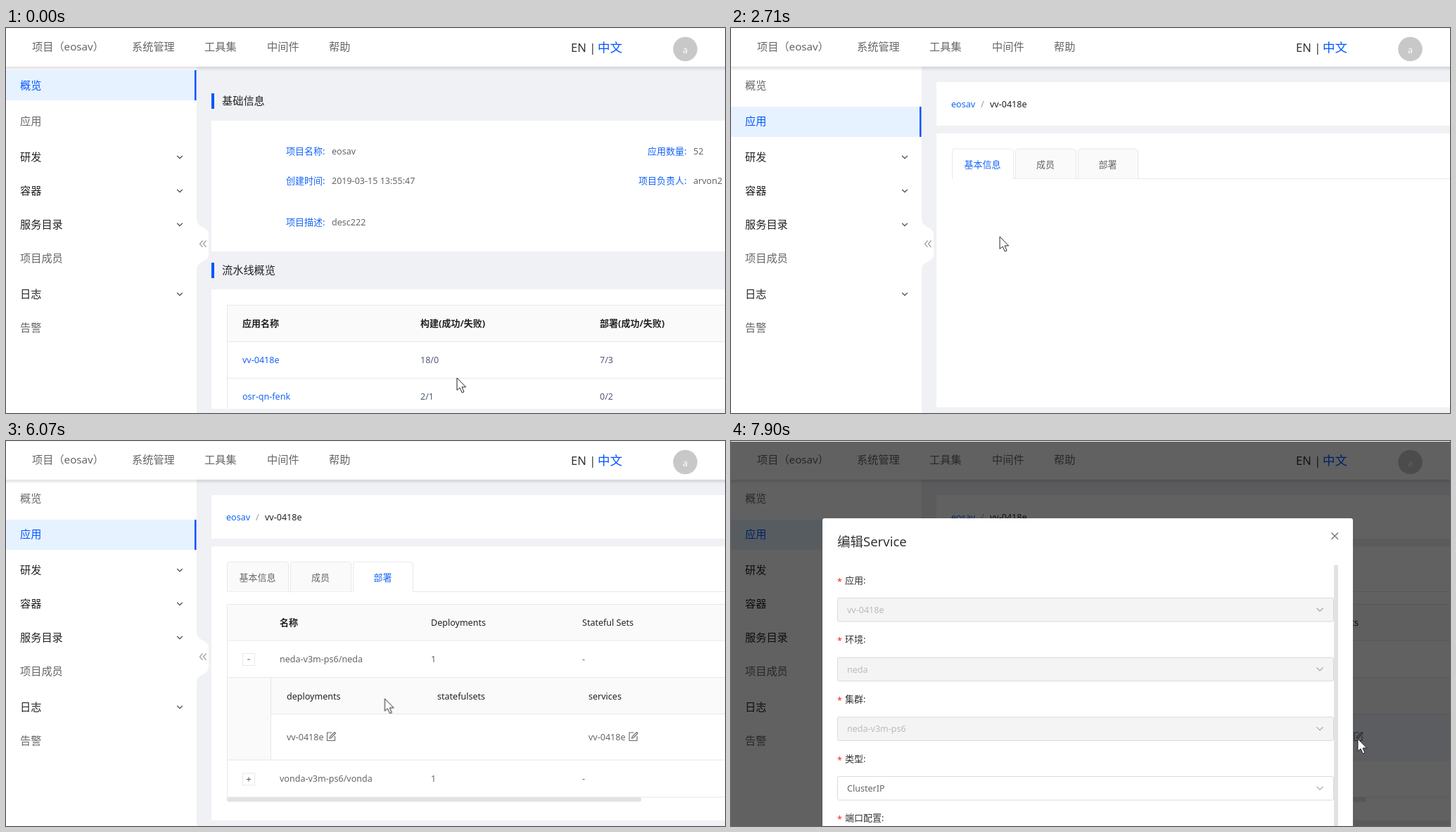
Recreate the animation shown at these times as an HTML page. Size 1022x548 px, loop 8000 ms.

```html
<!DOCTYPE html>
<html lang="zh-CN">
<head>
<meta charset="utf-8">
<style>
html, body { margin: 0; width: 100%; height: 100%; overflow: hidden; background: #f0f1f5; }
svg { display: block; width: 100%; height: 100%; }
text { font-family: "Noto Sans", "Noto Sans CJK SC", "Noto Sans CJK", sans-serif; white-space: pre; }
#modal { transform-origin: 510px 447px; }
</style>
</head>
<body>
<svg id="stage" viewBox="0 0 1022 548"></svg>
<script>
const LOOP = 8000;
const BLUE = '#0055ff', LINK = '#1464f6', GRAY = '#666', DARK = '#222', LINE = '#e8e8e8', BG = '#f0f1f5', HOVER = '#f5f8ff';
const PROJECT = 'eosav', USER = 'arvon2', APP = 'vv-0418e';
const ENV = 'neda', CLUSTER = 'neda-v3m-ps6', OTHER = 'vonda-v3m-ps6/vonda';

// ---------- drawing helpers ----------
const rect = (x, y, w, h, fill, extra = '') => `<rect x="${x}" y="${y}" width="${w}" height="${h}" fill="${fill}" ${extra}/>`;
const path = (d, stroke, extra = '') => `<path d="${d}" fill="none" stroke="${stroke}" ${extra}/>`;
const hline = (x, y, w) => rect(x, y, w, 1, LINE);
const group = (id, ...parts) => `<g id="${id}">${parts.flat().join('')}</g>`;

// Latin-only strings run slightly smaller and lighter to sit well beside the Chinese text.
const isLatin = str => /^[\x00-\x7f]+$/.test(str);
function text(x, cy, str, fill = GRAY, { size = 13, weight = 400, anchor = 'start', id = '' } = {}) {
  const px = isLatin(str) ? size * 0.965 : size;
  return `<text ${id && `id="${id}"`} x="${x}" y="${cy + size * 0.36}" font-size="${px}" font-weight="${weight}" text-anchor="${anchor}" fill="${fill}">${str}</text>`;
}
const bold = (x, cy, str) => text(x, cy, str, DARK, { weight: isLatin(str) ? 500 : 600 });
const menuText = (x, cy, str, fill, id) => text(x, cy, str, fill, { size: 15.2, id });
const chevron = (x, y, s, color) => path(`M${x - s} ${y - s / 2}l${s} ${s}l${s} ${-s}`, color, 'stroke-width="1.3"');
const panel = (y, h) => rect(292, y, 730, h, '#fff');
const scrollbar = (y, w) => rect(314, y, w, 6.5, '#e2e2e2', 'rx="3"');

const spinner = (id, x, y) => `<g transform="translate(${x} ${y})"><g id="${id}">` +
  [0.5, 0.32, 0.32, 0.32].map((o, i) =>
    `<circle cx="8.8" r="3.9" fill="${BLUE}" opacity="${o}" transform="rotate(${i * 90})"/>`).join('') + '</g></g>';

const editIcon = (x, y) => path(
  `M${x + 7} ${y + 1}H${x + 0.5}V${y + 12.5}H${x + 11.5}V${y + 6}M${x + 4} ${y + 9.2}L${x + 4.6} ${y + 6.8}L${x + 11} ${y + 0.5}L${x + 12.6} ${y + 2}L${x + 6.3} ${y + 8.5}Z`,
  'currentColor', 'stroke-width="1.1"');

const expander = (y, sign) => rect(336.5, y - 8.5, 17, 17, '#fff', `stroke="${LINE}"`) +
  path(sign === '+' ? `M342 ${y}h6M345 ${y - 3}v6` : `M343.3 ${y}h3.6`, '#555');

const selected = (y, cy, label) => rect(0, y, 271, 43, '#e6f2ff') + rect(268, y, 2.5, 43, BLUE) + menuText(20, cy, label, BLUE);

// ---------- page parts ----------
const header = [
  rect(0, 55, 1022, 6, 'url(#shade)'), rect(0, 0, 1022, 55, '#fff'), rect(0, 0, 1022, 1, '#e9fbf3'),
  [[37, `项目（${PROJECT}）`], [179, '系统管理'], [282, '工具集'], [371, '中间件'], [459, '帮助']]
    .map(([x, s]) => menuText(x, 27, s, GRAY)),
  text(803, 28, 'EN |', '#333', { size: 17.2 }),
  text(841, 28, '中文', BLUE, { size: 17.5 }),
  '<circle cx="965.5" cy="30" r="17.3" fill="#c8c8c8"/>',
  text(965.5, 31, 'a', '#fff', { anchor: 'middle' })
];

const sidebar = [
  rect(0, 55, 271, 493, '#fff'),
  '<path d="M271 272C272 286 288 282 288 294V322C288 334 272 330 271 344Z" fill="#fff"/>',
  path('M279.5 302.5l-4 4.7l4 4.7M284.5 302.5l-4 4.7l4 4.7', '#999', 'stroke-width="1.2"'),
  [[184, '研发', 1], [232, '容器', 1], [280, '服务目录', 1], [328, '项目成员'], [379, '日志', 1], [427, '告警']]
    .map(([y, s, open]) => menuText(20, y, s, open ? DARK : GRAY) + (open ? chevron(247, y - 0.2, 3.8, '#444') : ''))
];

const section = (y, title) => rect(292, y, 4, 22, BLUE) + text(307, y + 11, title, DARK, { size: 15.2 });
const field = (x, valueX, y, label, value) => text(x, y, label + ':', LINK) + text(valueX, y, value);

const overview = group('overview',
  selected(60, 82, '概览'), menuText(20, 133, '应用', GRAY, 'menuApp'),
  section(93, '基础信息'), panel(132, 186),
  field(398, 463, 175, '项目名称', PROJECT), field(912, 977, 175, '应用数量', '52'),
  field(398, 463, 217, '创建时间', '2019-03-15 13:55:47'), field(899, 977, 217, '项目负责人', USER),
  field(398, 463, 276, '项目描述', 'desc222'),
  section(334, '流水线概览'), panel(372, 170),
  rect(314, 394, 708, 52, '#fafafa'), [394, 446, 498].map(y => hline(314, y, 708)), rect(314, 394, 1, 148, LINE),
  [[336, '应用名称'], [589, '构建(成功/失败)'], [844, '部署(成功/失败)']].map(([x, s]) => bold(x, 420, s)),
  [[472, APP, '18/0', '7/3'], [524, 'osr-qn-fenk', '2/1', '0/2']].map(([y, name, built, deployed]) =>
    text(336, y, name, LINK) + text(589, y, built, '#515a75') + text(844, y, deployed, '#515a75')),
  rect(292, 542, 730, 6, BG));

const listRows = [['oqe004', 'XXXX', '07'], [APP, 'b', '07'], ['wesrtl', 'asd', '06'], ['fenk004', 'yyyyy', '06']];
const list = group('list',
  panel(77, 67), rect(314, 93.5, 105, 34.5, BLUE, 'rx="2"'), text(336, 111, '新建应用', '#fff', { size: 15.2, weight: 500 }),
  rect(451.5, 94, 215, 33.5, '#fff', 'stroke="#d9d9d9" rx="2"'), text(465, 111, 'search', '#bfbfbf'),
  path('M654 113.5l3 3M645.5 110a4.5 4.5 0 1 0 9 0a4.5 4.5 0 1 0 -9 0', '#aaa', 'stroke-width="1.1"'),
  panel(155, 376),
  group('listTable',
    rect(314, 177, 708, 52, '#fafafa'), rect(314, 281, 708, 52, '#fff', 'id="listHover"'),
    [177, 228.5, 280.5, 332.5, 384.5, 436.5].map(y => hline(314, y, 708)), rect(314, 177, 1, 280, LINE),
    [[336, '应用名称'], [550, '创建人'], [765, '描述信息'], [980, '创建时间']].map(([x, s]) => bold(x, 203, s)),
    listRows.map(([name, note, month], i) => {
      const y = 255 + 52 * i;
      return text(336, y, name, LINK) + text(550, y, USER) + text(765, y, note) + text(980, y, `2019-${month}-25`);
    }),
    scrollbar(456, 712)));

const tabs = [[314, 88, '基本信息'], [404, 87, '成员'], [493, 86, '部署']];
const tabBar = (id, active) => group(id, hline(314, 214, 708), tabs.map(([x, w, s], i) => {
  const on = i === active;
  return `<path d="M${x + 0.5} 214.5V176q0-4 4-4H${x + w - 4.5}q4 0 4 4V214.5" fill="${on ? '#fff' : '#fafafa'}" stroke="${LINE}"/>` +
    (on ? rect(x + 1, 213, w - 2, 3, '#fff') : '') +
    text(x + w / 2 - 0.5, 194, s, on ? LINK : GRAY, { anchor: 'middle', id: `${id}${i}` });
}));

const deployRow = (y, name, sign) => expander(y + 1, sign) + text(389, y, name) + text(604, y, '1') + text(819, y, '-');
const detail = group('detail',
  panel(77, 62), text(313, 108, PROJECT, LINK), text(355, 108, '/', '#999'), text(368, 108, APP, DARK),
  panel(150, 390), tabBar('tabInfo', 0), tabBar('tabDeploy', 2),
  group('loading', spinner('spinA', 827.5, 447.5)),
  group('deploy',
    rect(314, 232, 708, 52, '#fafafa'), rect(314, 284, 708, 52, '#fff', 'id="rowA"'),
    [232, 283.5, 336].map(y => hline(314, y, 708)),
    bold(389, 258, '名称'), bold(604, 258, 'Deployments'), bold(819, 258, 'Stateful Sets'),
    group('closed',
      rect(314, 337, 708, 52, '#fff', 'id="rowB"'), hline(314, 389, 708), rect(314, 232, 1, 158, LINE),
      deployRow(310, `${CLUSTER}/${ENV}`, '+'), deployRow(363, OTHER, '+'), scrollbar(390, 589)),
    group('open',
      rect(314, 337, 708, 117, '#fafafa'), rect(376, 389, 646, 65, '#fff', 'id="rowC"'),
      hline(376, 388, 646), hline(314, 453.5, 708), hline(314, 506.5, 708),
      rect(376, 337, 1, 117, LINE), rect(314, 232, 1, 275, LINE),
      deployRow(310, `${CLUSTER}/${ENV}`, '-'),
      bold(399, 363, 'deployments'), bold(613, 363, 'statefulsets'), bold(828, 363, 'services'),
      text(399, 421, APP), `<g color="${GRAY}">${editIcon(456, 414)}</g>`,
      `<g id="service">${text(828, 421, APP, 'currentColor')}${editIcon(885.5, 414)}</g>`,
      deployRow(480.5, OTHER, '+'), scrollbar(507, 589))));

const formRows = [['应用', APP], ['环境', ENV], ['集群', CLUSTER], ['类型', 'ClusterIP'], ['端口配置', '']];
const modal = group('modal',
  rect(130, 110, 754, 800, '#fff', 'rx="3"'),
  text(151, 143, '编辑Service', '#333', { size: 18.5 }),
  path('M853.5 130.5l9.5 9.5m0 -9.5l-9.5 9.5', '#777', 'stroke-width="1.4"'),
  group('modalLoading', spinner('spinB', 507, 461)),
  group('form', formRows.map(([label, value], i) => {
    const y = 198 + 84.7 * i, locked = i < 3;
    return text(151, y + 2, '*', '#f5222d') + text(162, y, label + ':', '#333') +
      rect(151.5, y + 25.5, 705, 33.5, locked ? '#f4f4f4' : '#fff', 'stroke="#d9d9d9" rx="2"') +
      text(165, y + 42.3, value, locked ? '#bbb' : GRAY) + chevron(837, y + 42, 4.5, '#aaa');
  }), rect(857, 176, 6, 400, '#e2e2e2', 'rx="3"')));

const cursor = group('cursor',
  '<circle id="ring" r="14" fill="#888" fill-opacity=".12" stroke="#777"/>',
  '<path id="arrow" d="M0 0V17.5L4 14L7.2 21L10 19.8L7 13H12.6Z" fill="#fff" stroke="#222"/>',
  group('hand',
    '<path d="M-2.5 13.5L-3.6 3A2 2 0 0 1 .4 2L1.6 9C2 7.4 5.4 7.2 5.8 9.4C6.2 8 9 8.2 9.2 10.2C9.6 9.2 12 9.4 12 11.8V17C12 21 10 24.5 7 24.5H2C-1.5 24.5-3.5 20-7.2 15.5C-8.6 13-6 11.2-4.2 12.6Z" fill="#fff" stroke="#222" stroke-width="1.1"/>',
    path('M1.6 9l.4 4M5.8 9.6l.2 3.6M9.2 10.4v3', '#222')));

stage.innerHTML =
  `<defs><linearGradient id="shade" x2="0" y2="1"><stop stop-color="#000" stop-opacity=".12"/><stop offset="1" stop-color="#000" stop-opacity="0"/></linearGradient></defs>` +
  [rect(0, 0, 1022, 548, BG), sidebar, overview,
   group('appMenu', menuText(20, 82, '概览', GRAY), selected(112, 133, '应用')),
   list, detail, header, rect(0, 1, 1022, 547, '#000', 'id="mask"'), modal, cursor].flat(3).join('');

// ---------- motion ----------
const $ = id => document.getElementById(id);
const play = (id, frames) => $(id).animate(frames, { duration: LOOP, iterations: Infinity });

// steps: [time, value] pairs; each value holds until the next one
function hold(id, prop, steps) {
  const frames = steps.map(([t, v]) => ({ offset: t / LOOP, [prop]: v, easing: 'step-end' }));
  play(id, [...frames, { offset: 1, [prop]: steps.at(-1)[1] }]);
}
const during = (id, prop, on, off, ...spans) =>
  hold(id, prop, [...(spans[0][0] ? [[0, off]] : []), ...spans.flatMap(([a, b]) => b < LOOP ? [[a, on], [b, off]] : [[a, on]])]);
const show = (id, ...spans) => during(id, 'opacity', 1, 0, ...spans);

show('overview', [0, 760]);
show('appMenu', [760, LOOP]);
show('list', [760, 2180]);
show('listTable', [920, LOOP]);
show('detail', [2180, LOOP]);
show('tabInfo', [2180, 3420]);
show('tabDeploy', [3420, LOOP]);
show('loading', [3420, 3730]);
show('deploy', [3730, LOOP]);
show('closed', [0, 5370]);
show('open', [5370, LOOP]);
show('modalLoading', [0, 7900]);
show('form', [7900, LOOP]);

during('menuApp', 'fill', BLUE, GRAY, [540, 760]);
during('tabInfo2', 'fill', LINK, GRAY, [3130, 3420]);
during('listHover', 'fill', HOVER, '#fff', [1540, 2180]);
during('rowB', 'fill', HOVER, '#fff', [4500, 4800]);
during('rowA', 'fill', HOVER, '#fff', [4350, 4500], [4800, 5840]);
during('rowC', 'fill', '#f1f5fe', '#fff', [6300, LOOP]);
during('service', 'color', LINK, GRAY, [6610, 7570]);

hold('mask', 'opacity', [[0, 0], [7570, 0.18], [7650, 0.38], [7750, 0.62]]);
hold('modal', 'opacity', [[0, 0], [7570, 0.45], [7650, 0.89], [7750, 1]]);
hold('modal', 'transform', [[0, 'scale(.6)'], [7570, 'scale(.7)'], [7650, 'scale(.917)'], [7750, 'scale(1)']]);

const spin = (id, angle, at) => {
  const start = angle - 0.3 * at;
  play(id, [{ transform: `rotate(${start}deg)` }, { transform: `rotate(${start + 0.3 * LOOP}deg)` }]);
};
spin('spinA', -8, 3650);
spin('spinB', 45, 7650);

// first time, last time, number of jumps, destination
const moves = [
  [70, 540, 7, 35, 139], [920, 1540, 9, 382, 320], [1620, 1850, 4, 372, 303],
  [2710, 3200, 7, 553, 193], [3960, 4740, 11, 361, 346], [4800, 4800, 1, 356, 316],
  [4880, 4960, 2, 347, 311], [5690, 6460, 11, 790, 440], [6530, 6610, 2, 867, 428],
  [6790, 6850, 2, 879, 429], [7020, 7250, 4, 891, 424]
];
const ease = p => p * p * (3 - 2 * p);
const place = (x, y) => `translate(${x}px, ${y}px)`;
let [x, y] = [641, 498];
const trail = [[0, place(x, y)]];
for (const [t0, t1, n, tx, ty] of moves) {
  for (let i = 1; i <= n; i++) {
    const p = ease(i / n), t = n > 1 ? t0 + (t1 - t0) * (i - 1) / (n - 1) : t0;
    trail.push([t, place(x + (tx - x) * p, y + (ty - y) * p)]);
  }
  [x, y] = [tx, ty];
}
hold('cursor', 'transform', trail);

const handSpans = [[540, 1070], [1700, 2180], [3130, 4040], [4960, 5690], [6610, 7570]];
show('hand', ...handSpans);
during('arrow', 'opacity', 0, 1, ...handSpans);
show('ring', [610, 760], [2030, 2180], [3280, 3420], [5040, 5220], [7340, 7510]);
</script>
</body>
</html>
```
